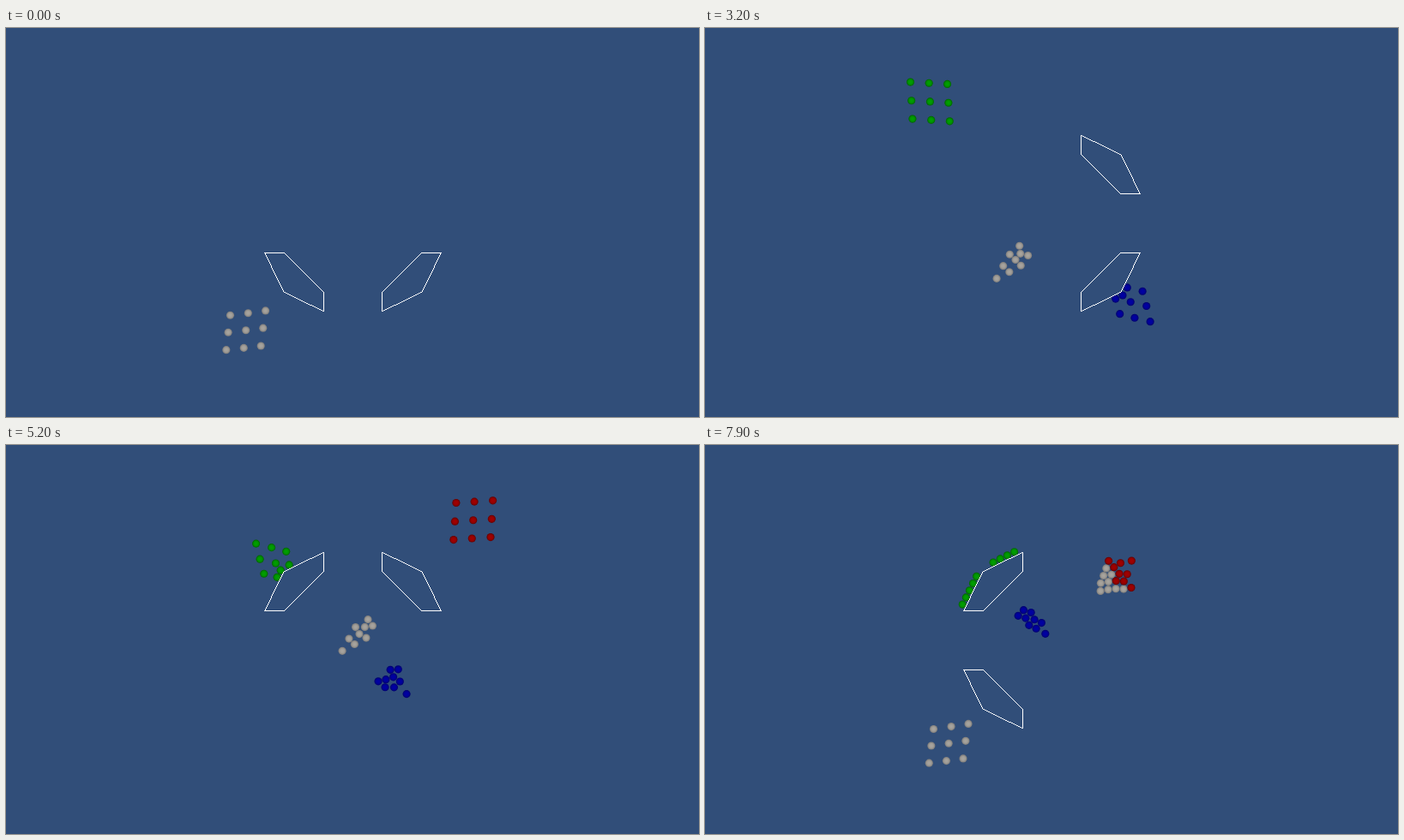
These frames come from a looping animation (808x454 px, 8000 ms). An HTML page with a canvas:

```html
<!DOCTYPE html>
<html lang="en">
<head>
<meta charset="utf-8">
<title>Crowd crossing</title>
<style>
  html, body { margin: 0; width: 100%; height: 100%; overflow: hidden; background: #314e79; }
  canvas { display: block; }
</style>
</head>
<body>
<canvas id="stage" width="808" height="454"></canvas>
<script>
const ctx = document.getElementById('stage').getContext('2d');
const LOOP = 8000, FRAME = 100, DT = 20;
const UNIT = 22.88, CX = 404.46, CY = 228; // the crowd's centre, just left of the walls'
const WALL_X = 404.5;
const SPEED = 36.8; // pixels per second
const RADIUS = 0.2 * UNIT;
const FIRST_SPAWN = -1360, SPAWN_GAP = 1932;
const FIRST_SWAP = 1370, SWAP_GAP = 2300;

const GREY = ['#aaa69f', '#a09d98', '#7d7b79'];
const BLUE = ['#0000a6', '#00009a', '#00006c'];
const GREEN = ['#00a200', '#009600', '#006400'];
const RED = ['#a40000', '#980000', '#640000'];
const BL = [-1, 1], BR = [1, 1], TR = [1, -1], TL = [-1, -1];

// Nine agents per squad, each bound for the point opposite its start.
function makeSquad([sx, sy], tint, order) {
  return Array.from({ length: 9 }, (_, i) => {
    const dx = (sx * 7 + i % 3 - 1) * UNIT;
    const dy = (sy * 7 + Math.floor(i / 3) - 1) * UNIT;
    return {
      x: CX + dx, y: CY + dy, goalX: CX - dx, goalY: CY - dy,
      tint, spawn: FIRST_SPAWN + order * SPAWN_GAP
    };
  });
}

const agents = [[BL, GREY], [BR, BLUE], [TL, GREEN], [TR, RED], [BL, GREY]]
  .flatMap(([corner, tint], order) => makeSquad(corner, tint, order));

const makeWall = ([sx, sy]) =>
  [[1.5, 4.5], [3.5, 3.5], [4.5, 1.5], [3.5, 1.5], [1.5, 3.5]]
    .map(([x, y]) => [WALL_X + sx * x * UNIT, CY + sy * y * UNIT]);
const ring = [BL, BR, TR, TL].map(makeWall);
const edgesOf = wall => wall.map((p, i) => [p, wall[(i + 1) % wall.length]]);

// Two neighbouring walls stand at a time, and the pair goes round.
function wallsAt(t) {
  const turn = Math.max(0, Math.floor((t - FIRST_SWAP) / SWAP_GAP) + 1);
  return [ring[turn % 4], ring[(turn + 1) % 4]];
}

function walk(a, ms) {
  const dx = a.goalX - a.x, dy = a.goalY - a.y;
  const k = SPEED * ms / 1000 / Math.hypot(dx, dy);
  a.x += dx * k;
  a.y += dy * k;
}

// Pushes are summed before they apply, so the order of agents does not matter.
function separate(crowd) {
  const push = crowd.map(() => [0, 0]);
  for (let i = 0; i < crowd.length; i++) {
    for (let j = 0; j < i; j++) {
      const dx = crowd[i].x - crowd[j].x, dy = crowd[i].y - crowd[j].y;
      const dist = Math.hypot(dx, dy);
      if (dist >= 2 * RADIUS) continue;
      const k = (2 * RADIUS - dist) / dist * 0.3;
      push[i][0] += dx * k;
      push[i][1] += dy * k;
      push[j][0] -= dx * k;
      push[j][1] -= dy * k;
    }
  }
  crowd.forEach((a, i) => {
    a.x += push[i][0];
    a.y += push[i][1];
  });
}

function keepOut(a, edges) {
  for (const [[x0, y0], [x1, y1]] of edges) {
    const ex = x1 - x0, ey = y1 - y0;
    const along = ((a.x - x0) * ex + (a.y - y0) * ey) / (ex * ex + ey * ey);
    const k = Math.min(1, Math.max(0, along));
    const dx = a.x - x0 - ex * k, dy = a.y - y0 - ey * k;
    const dist = Math.hypot(dx, dy);
    if (dist >= RADIUS) continue;
    a.x += dx * (RADIUS / dist - 1);
    a.y += dy * (RADIUS / dist - 1);
  }
}

function advance(t) {
  const crowd = agents.filter(a => t >= a.spawn);
  const edges = wallsAt(t).flatMap(edgesOf);
  crowd.forEach(a => walk(a, Math.min(DT, t - a.spawn)));
  for (let pass = 0; pass < 10; pass++) {
    separate(crowd);
    crowd.forEach(a => keepOut(a, edges));
  }
  return crowd;
}

// The whole walk is worked out once, one snapshot per frame.
const frames = [];
for (let t = FIRST_SPAWN; t < LOOP; t += DT) {
  const crowd = advance(t);
  if (t >= 0 && t % FRAME === 0) frames.push(crowd.map(({ x, y, tint }) => ({ x, y, tint })));
}

function drawDot({ x, y, tint: [core, body, rim] }) {
  const fill = ctx.createRadialGradient(x, y, 0, x, y, RADIUS);
  fill.addColorStop(0, core);
  fill.addColorStop(0.55, body);
  fill.addColorStop(1, rim);
  ctx.fillStyle = fill;
  ctx.beginPath();
  ctx.arc(x, y, RADIUS, 0, Math.PI * 2);
  ctx.fill();
}

// A hard line, one pixel wide.
function drawLine([[x0, y0], [x1, y1]]) {
  const n = Math.round(Math.max(Math.abs(x1 - x0), Math.abs(y1 - y0)));
  for (let i = 0; i <= n; i++) {
    const k = i / n;
    ctx.fillRect(Math.floor(x0 + (x1 - x0) * k), Math.floor(y0 + (y1 - y0) * k), 1, 1);
  }
}

function draw(index) {
  ctx.fillStyle = '#314e79';
  ctx.fillRect(0, 0, 808, 454);
  frames[index].forEach(drawDot);
  ctx.fillStyle = '#fff';
  wallsAt(index * FRAME).flatMap(edgesOf).forEach(drawLine);
}

const begin = performance.now();
function tick() {
  draw(Math.floor((performance.now() - begin) % LOOP / FRAME));
  requestAnimationFrame(tick);
}
tick();
</script>
</body>
</html>
```
